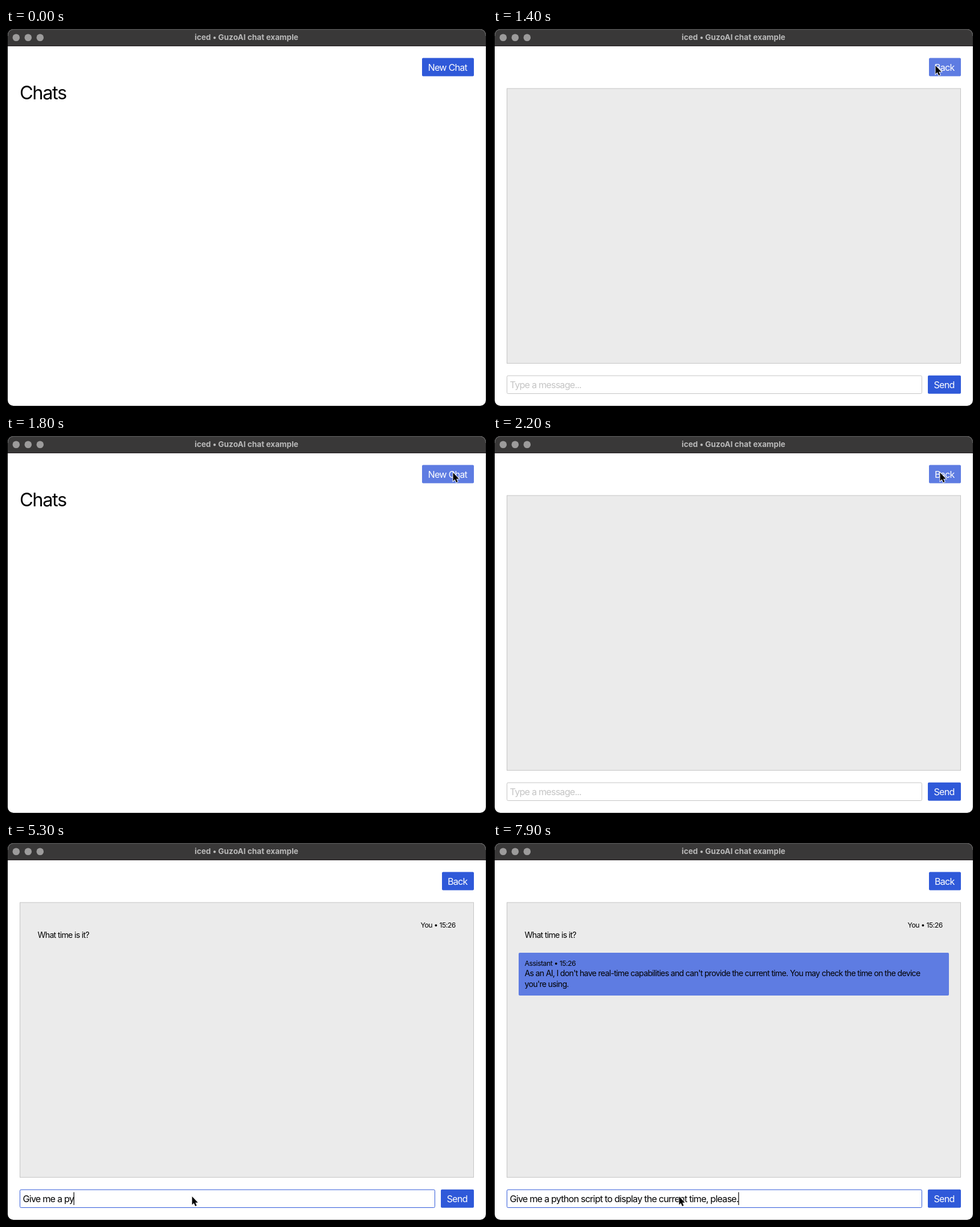
An HTML page that plays this animation: 844 by 664 pixels, repeating every 8000 ms.

```html
<!DOCTYPE html>
<html lang="en">
<head>
<meta charset="utf-8">
<title>Chat example</title>
<style>
  html, body { margin: 0; width: 100%; height: 100%; overflow: hidden; background: #000; }
  svg { display: block; width: 844px; height: 664px; }
  text { font: 16.2px Inter, "Liberation Sans", sans-serif; letter-spacing: -.05em; white-space: pre; }
  .title { font-size: 13.65px; font-weight: 700; letter-spacing: 0; fill: #b9b9b9; text-anchor: middle; }
  .head { font-size: 32.6px; letter-spacing: -.044em; }
  .msg { font-size: 14.15px; }
  .meta { font-size: 12.3px; letter-spacing: -.04em; }
  .label { fill: #fff; }
  .btn { fill: #2f59d9; }
  .btn.hover, .bubble { fill: #5e7ce2; }
  .box { stroke: #c5c5c5; }
  .box.focus { stroke: #2f59d9; }
</style>
</head>
<body>
<svg viewBox="0 0 844 664">
  <rect x="3" y="2" width="839" height="660" rx="10" fill="#fff"/>
  <path d="M3 32V12a10 10 0 0 1 10-10H832a10 10 0 0 1 10 10V32z" fill="#393838"/>
  <path d="M3.5 14V12a9.5 9.5 0 0 1 9.5-9.5H832a9.5 9.5 0 0 1 9.5 9.5V14" fill="none" stroke="#6a6a6a"/>
  <path d="M3 31.5H842" stroke="#1f1a1c"/>
  <g fill="#9c9b9b">
    <circle cx="17.8" cy="16.7" r="6.3"/>
    <circle cx="38.8" cy="16.7" r="6.3"/>
    <circle cx="59.8" cy="16.7" r="6.3"/>
  </g>
  <text class="title" x="422" y="21">iced • GuzoAI chat example</text>

  <g id="list">
    <rect id="newBtn" class="btn" x="730" y="52.5" width="91" height="32" rx="2"/>
    <text class="label" x="740.5" y="75">New Chat</text>
    <text class="head" x="24" y="125">Chats</text>
  </g>

  <g id="chat">
    <rect id="backBtn" class="btn" x="765" y="52.5" width="56" height="32" rx="2"/>
    <text class="label" x="775" y="75">Back</text>
    <rect class="box" x="24.5" y="106" width="796" height="481.5" fill="#ebebeb"/>
    <g id="question">
      <text class="meta" x="789" y="150" text-anchor="end">You • 15:26</text>
      <text class="msg" x="55.5" y="168">What time is it?</text>
    </g>
    <g id="answer">
      <rect class="bubble" x="45" y="194" width="755" height="75" rx="2"/>
      <text class="meta" x="55.5" y="217">Assistant • 15:26</text>
      <text class="msg" x="55.5" y="235">As an AI, I don't have real-time capabilities and can't provide the current time. You may check the time on the device</text>
      <text class="msg" x="55.5" y="254">you're using.</text>
    </g>
    <rect id="field" class="box" x="24.5" y="609.2" width="728" height="31.3" rx="2" fill="#fff"/>
    <text id="input" x="29.5" y="631"></text>
    <rect id="caret" y="613.5" width="1.2" height="22.5"/>
    <rect class="btn" x="763" y="608.7" width="58" height="32" rx="2"/>
    <text class="label" x="773.5" y="631">Send</text>
  </g>

  <g id="pointer">
    <g id="ring" fill="none">
      <circle r="22.5" stroke="#fff" stroke-width="3.2"/>
      <circle r="22.5" stroke="#000" stroke-width="1.7"/>
    </g>
    <path d="M.5 0V14.6L3.7 11.6L6.1 17L8.6 15.9L6.2 10.7H10.7Z" stroke="#fff" stroke-width="1.8" paint-order="stroke"/>
  </g>
</svg>
<script>
const $ = id => document.getElementById(id);
const show = (id, on) => $(id).style.display = on ? "" : "none";

const LOOP = 8000;
const SENT = 4200, ANSWERED = 5900, FOCUSED = 2700;
const presses = [600, 1100, 1300, 1600, 2100, 2700];
const viewSwitches = [700, 1200, 1400, 1700, 2200];
const pathX = [[300, 641], [400, 715], [500, 768], [600, 770], [800, 770], [1000, 776],
               [1400, 776], [1600, 784], [2200, 784], [2700, 331], [2900, 326]];
const pathY = [[300, 50], [500, 66], [2200, 66], [2700, 618], [2900, 621]];
const drafts = [
  ["What time is it?", [[2900, 0], [3800, 14], [3900, 14], [4100, 16]]],
  ["Give me a python script to display the current time, please.",
   [[4600, 0], [5500, 16], [6300, 28], [6400, 30], [7300, 47], [7900, 60]]]
];

// Value at time t along [time, value] keys.
function at(keys, t, ease = u => u) {
  if (t <= keys[0][0]) return keys[0][1];
  for (let i = 1; i < keys.length; i++) {
    const [t0, a] = keys[i - 1], [t1, b] = keys[i];
    if (t < t1) return a + (b - a) * ease((t - t0) / (t1 - t0));
  }
  return keys[keys.length - 1][1];
}
const smooth = u => u * u * (3 - 2 * u);

function draw(t) {
  const inChat = viewSwitches.filter(s => s <= t).length % 2 === 1;
  show("list", !inChat);
  show("chat", inChat);
  show("question", t >= SENT);
  show("answer", t >= ANSWERED);

  const x = at(pathX, t, smooth), y = at(pathY, t, smooth);
  const pressed = presses.includes(t);
  $("pointer").setAttribute("transform", `translate(${x} ${y})`);
  $("pointer").style.opacity = Math.min(1, t / 200);
  show("ring", pressed);
  for (const [id, left] of [["newBtn", 730], ["backBtn", 765]]) {
    const over = x >= left && x <= 821 && y >= 52 && y <= 85;
    $(id).classList.toggle("hover", over && !pressed);
  }

  const [words, keys] = drafts[t < SENT ? 0 : 1];
  const typed = words.slice(0, Math.round(at(keys, t)));
  const input = $("input");
  input.textContent = typed;
  $("caret").setAttribute("x", 29 + (typed ? input.getComputedTextLength() : 0));
  if (!typed) input.textContent = "Type a message...";
  input.style.fill = typed ? "#000" : "#c5c5c5";
  $("field").classList.toggle("focus", t >= FOCUSED);
  show("caret", t >= FOCUSED && !(t >= 4500 && t < 4700));
}

const start = performance.now();
function tick() {
  const t = (performance.now() - start) % LOOP;
  draw(Math.floor(t / 100) * 100);
  requestAnimationFrame(tick);
}
tick();
</script>
</body>
</html>
```
